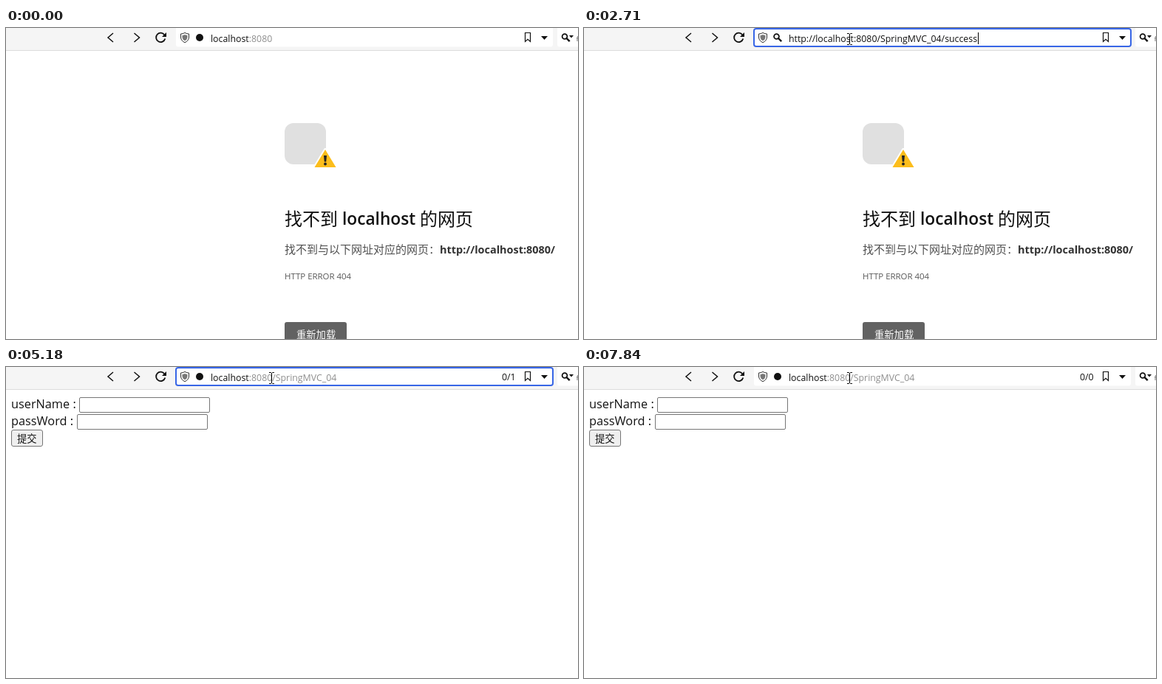
An HTML page that plays this animation: 774x422 px, repeating every 8000 ms.

```html
<!DOCTYPE html>
<html lang="zh-CN">
<head>
<meta charset="utf-8">
<title>Address bar demo</title>
<style>
html, body { margin: 0; width: 100%; height: 100%; overflow: hidden; background: #fff; }
svg { display: block; width: 774px; height: 422px; }
text { font: 12.35px "Open Sans", "Noto Sans CJK SC", "Noto Sans CJK", sans-serif; fill: #111; white-space: pre; }
.cjk { font-family: "Noto Sans CJK SC", "Noto Sans CJK", sans-serif; }
.semi { font-weight: 600; font-size: 12.2px; }
.dim { fill: #8e8e8e; }
.white { fill: #fff; }
.line { fill: none; stroke: #111; stroke-width: 1.5; }
.field { fill: #fff; stroke: #767676; }
.sel { fill: #3390fa; }
#menu { filter: drop-shadow(0 2px 3px rgba(0, 0, 0, .45)); }

/* Every part is switched on and off on one 8 s clock. */
.t { animation: 8s step-end infinite; opacity: 0; }
#missing { animation-name: missing; }
#form { animation-name: form; }
#ring { animation-name: ring; }
#home { animation-name: home; }
#edit { animation-name: edit; }
#picked { animation-name: picked; }
#typed { animation-name: typed; }
#loading { animation-name: loading; }
#short { animation-name: short; }
#full { animation-name: full; }
#caret1 { animation-name: caret1; }
#caret2 { animation-name: caret2; }
#menu { animation-name: menu; }
#one { animation-name: one; }
#zero { animation-name: zero; }
#stop { animation-name: stop; }
#reload { animation-name: reload; }
#arrow { animation-name: arrow, glide; }
#beam { animation-name: beam; }
#hand { animation-name: hand; }

@keyframes missing { 0% { opacity: 1 } 49.75% { opacity: 0 } }
@keyframes form { 0% { opacity: 0 } 49.75% { opacity: 1 } }
@keyframes ring { 0%, 48.125%, 72.125%, 95.375% { opacity: 0 } 19.875%, 64.75%, 83% { opacity: 1 } }
@keyframes home { 0% { opacity: 1 } 19.875% { opacity: 0 } }
@keyframes edit { 0%, 29% { opacity: 0 } 19.875% { opacity: 1 } }
@keyframes picked { 0%, 33.125% { opacity: 0 } 29% { opacity: 1 } }
@keyframes typed { 0%, 48.125%, 95.375% { opacity: 0 } 33.125%, 90.5% { opacity: 1 } }
@keyframes loading { 0%, 50.625%, 97.125% { opacity: 0 } 48.125%, 95.375% { opacity: 1 } }
@keyframes short { 0%, 66.375%, 83.875% { opacity: 0 } 50.625%, 72.125%, 97.125% { opacity: 1 } }
@keyframes full { 0%, 72.125%, 90.5% { opacity: 0 } 66.375%, 83.875% { opacity: 1 } }
@keyframes caret1 { 0%, 26.5% { opacity: 0 } 19.875% { opacity: 1 } }
@keyframes caret2 { 0%, 39.875%, 48.125%, 95.375% { opacity: 0 } 33.125%, 46.375%, 90.5% { opacity: 1 } }
@keyframes menu { 0%, 48.125%, 95.375% { opacity: 0 } 34%, 91.375% { opacity: 1 } }
@keyframes one { 0%, 72.125% { opacity: 0 } 52.25% { opacity: 1 } }
@keyframes zero { 0%, 95.375% { opacity: 0 } 73.875%, 97.125% { opacity: 1 } }
@keyframes stop { 0%, 52.25%, 73.875%, 98% { opacity: 0 } 48.125%, 72.125%, 95.375% { opacity: 1 } }
@keyframes reload { 0%, 52.25%, 73.875%, 98% { opacity: 1 } 48.125%, 72.125%, 95.375% { opacity: 0 } }
@keyframes arrow { 0%, 17.375% { opacity: 0 } 9.875% { opacity: 1 } }
@keyframes beam { 0%, 25.625%, 88% { opacity: 0 } 17.375%, 33.125%, 90.5% { opacity: 1 } }
@keyframes hand { 0%, 33.125%, 90.5% { opacity: 0 } 25.625%, 88% { opacity: 1 } }
@keyframes glide {
  0% { transform: translate(440px, 238px) }
  9.875% { transform: translate(440px, 238px); animation-timing-function: steps(4) }
  13.25% { transform: translate(382px, 85px); animation-timing-function: steps(5) }
  17.375%, 100% { transform: translate(359px, 20px) }
}
</style>
</head>
<body>
<svg viewBox="0 0 774 422">
  <defs>
    <g id="lens" fill="none" stroke="currentColor">
      <circle cx="-1.5" cy="-1.5" r="3.4" stroke-width="1.8"/>
      <path d="M1 1L5.2 5.2" stroke-width="2.4"/>
    </g>
    <path id="doc" d="M-4.5-5.5H1.5L4.5-2.5V6.5H-4.5ZM1.5-5.5V-2.5H4.5" fill="#fff" stroke="#777"/>
  </defs>
  <rect width="774" height="422" fill="#fff"/>

  <g id="missing" class="t">
    <rect x="377" y="129" width="56" height="56" rx="12" fill="#e0e0e0"/>
    <path d="M432 165L446.5 189H417.500Z" fill="#fcbd1b" stroke="#fff" stroke-width="4" stroke-linejoin="round" paint-order="stroke"/>
    <path d="M430 173H434L433.200 181.500H430.800Z" fill="#222"/>
    <circle cx="432" cy="184.500" r="1.900" fill="#222"/>
    <text class="cjk" x="377" y="267.500" style="font-size:24px">找不到</text>
    <text x="455" y="267" style="font-size:22.700px;font-weight:600">localhost</text>
    <text class="cjk" x="560" y="267.500" style="font-size:24px">的网页</text>
    <text class="cjk" x="377" y="306" style="font-size:15px;fill:#505050">找不到与以下网址对应的网页：</text>
    <text x="587" y="306" style="font-size:14.450px;font-weight:700;fill:#333">http://localhost:8080/</text>
    <text x="377" y="341" style="font-size:11.430px;fill:#555">HTTP ERROR 404</text>
    <rect x="377" y="399" width="84" height="32" rx="3" fill="#626262"/>
    <text class="cjk white" x="393" y="421" style="font-size:13.300px">重新加载</text>
  </g>

  <g id="form" class="t">
    <text x="7" y="56" style="font-size:16.300px">userName :</text>
    <text x="7" y="79" style="font-size:16.300px">passWord :</text>
    <rect class="field" x="99.500" y="41.500" width="176" height="20" rx="1.500"/>
    <rect class="field" x="96.500" y="64.500" width="176" height="20" rx="1.500"/>
    <rect class="field" x="7.500" y="85.500" width="42" height="22" rx="2.500" style="fill:#efefef"/>
    <text class="cjk" x="15" y="102" style="font-size:13.300px">提交</text>
  </g>

  <!-- toolbar -->
  <rect width="774" height="30" fill="#f5f5f5"/>
  <rect y="30" width="774" height="1" fill="#dcdcdc"/>
  <path class="line" d="M145 7L138 13L145 19M173.500 7L180.500 13L173.500 19"/>
  <g id="reload" class="t">
    <path class="line" d="M214.500 9.500A6.200 6.200 0 1 0 215.300 14.500" style="stroke-width:1.800"/>
    <path d="M217 6V12H211Z" fill="#111"/>
  </g>
  <path id="stop" class="t line" d="M204 8L214 18M214 8L204 18"/>
  <rect x="230" y="-4" width="510" height="29.500" rx="3" fill="#fff"/>
  <rect x="746" y="-4" width="40" height="29.500" rx="3" fill="#fff"/>
  <use href="#lens" x="757.500" y="13" color="#111"/>
  <path d="M762 10H768L765 13.500Z" fill="#111"/>
  <path d="M774 11L772.500 14H774M773 14V18" fill="none" stroke="#777"/>
  <rect id="ring" class="t" x="230" y="1" width="510" height="24" rx="3" fill="#fff" stroke="#3866e6" stroke-width="2"/>
  <path d="M242 6.500Q245 8 247.500 8V13Q247 17.500 242 19.700Q237 17.500 236.500 13V8Q239 8 242 6.500Z" fill="#fff" stroke="#333"/>
  <path d="M242 9Q244 10 245.500 10V13Q245 16 242 17.300Q239 16 238.500 13V10Q240 10 242 9Z" fill="#777"/>
  <circle cx="262" cy="13" r="5" fill="#111"/>
  <path class="line" d="M702.500 6.500H709.500V18.500L706 15.300L702.500 18.500Z" style="stroke-width:1.200"/>
  <path d="M724 11H733L728.500 16Z" fill="#111"/>
  <text id="one" class="t" x="671" y="18">0/1</text>
  <text id="zero" class="t" x="671" y="18">0/0</text>

  <!-- address -->
  <text id="home" class="t" x="277" y="18.500">localhost<tspan class="dim">:8080</tspan></text>
  <text id="edit" class="t" x="277" y="18.500">http://localhost:8080</text>
  <g id="picked" class="t">
    <rect class="sel" x="277" y="6" width="119" height="16"/>
    <text class="white" x="277" y="18.500">http://localhost:8080</text>
  </g>
  <g id="typed" class="t">
    <rect x="255" y="6" width="14" height="14" fill="#fff"/>
    <use href="#lens" x="262" y="13" color="#111"/>
    <text x="277" y="18.500">http://localhost:8080/SpringMVC_04/success</text>
  </g>
  <text id="loading" class="t" x="277" y="18.500">localhost<tspan class="dim">:8080/SpringMVC_04/success</tspan></text>
  <text id="short" class="t" x="277" y="18.500">localhost<tspan class="dim">:8080/SpringMVC_04</tspan></text>
  <g id="full" class="t">
    <rect class="sel" x="277" y="6" width="213" height="16"/>
    <text class="white" x="277" y="18.500">http://localhost:8080/SpringMVC_04/</text>
  </g>
  <rect id="caret1" class="t" x="357" y="6" width="1" height="16"/>
  <rect id="caret2" class="t" x="533" y="6" width="1" height="16"/>

  <g id="menu" class="t">
    <path d="M230 30H740V178Q740 182 736 182H234Q230 182 230 178Z" fill="#fff"/>
    <rect x="234" y="58" width="502" height="24" rx="2" fill="#4a70f0"/>
    <g class="dim">
      <text class="cjk dim" x="243" y="51" style="font-size:13px">使用</text>
      <text class="dim" x="273" y="50.500">tolpu</text>
      <text class="cjk dim" x="308" y="51" style="font-size:13px">搜索</text>
      <text class="cjk dim" x="243" y="99" style="font-size:13px">输入记录</text>
      <text class="cjk dim" x="243" y="147" style="font-size:13px">浏览记录</text>
    </g>
    <use href="#lens" x="251" y="70" color="#fff"/>
    <text class="white" x="265" y="74.500" style="font-weight:500">http://localhost:8080/SpringMVC_04/success</text>
    <use href="#doc" x="251" y="118"/>
    <text class="semi" x="265" y="122.500">http://localhost:8080/SpringMVC_04/success</text>
    <use href="#doc" x="251" y="166"/>
    <text class="semi" x="265" y="170.500">http://localhost:8080/SpringMVC_...</text>
    <text x="488" y="170.500">Title</text>
  </g>

  <!-- pointers -->
  <path id="arrow" class="t" d="M.5.5V16.500L4.200 13L6.800 19L9.200 18L6.700 12.200H11.800Z" fill="#fff" stroke="#000"/>
  <path id="beam" class="t" d="M356 7.500H358.500L359.500 8.500L360.500 7.500H363M359.500 8V22M356 22.500H358.500L359.500 21.500L360.500 22.500H363" fill="none" stroke="#000"/>
  <path id="hand" class="t" d="M357 29V16.500a1.900 1.900 0 0 1 3.800 0V22q1.700-1 2.600.6 1.700-.8 2.500.8 2.200-.4 2.500 1.600V30q0 2-1.700 4.400V37.500H358.500V35L353 29.500q-1.200-2 .4-2.800 1.400-.4 3.600 2.300ZM360.800 22V26M363.400 22.600V26.500M365.900 23.400V27" fill="#fff" stroke="#000" stroke-linejoin="round"/>
</svg>
</body>
</html>
```
